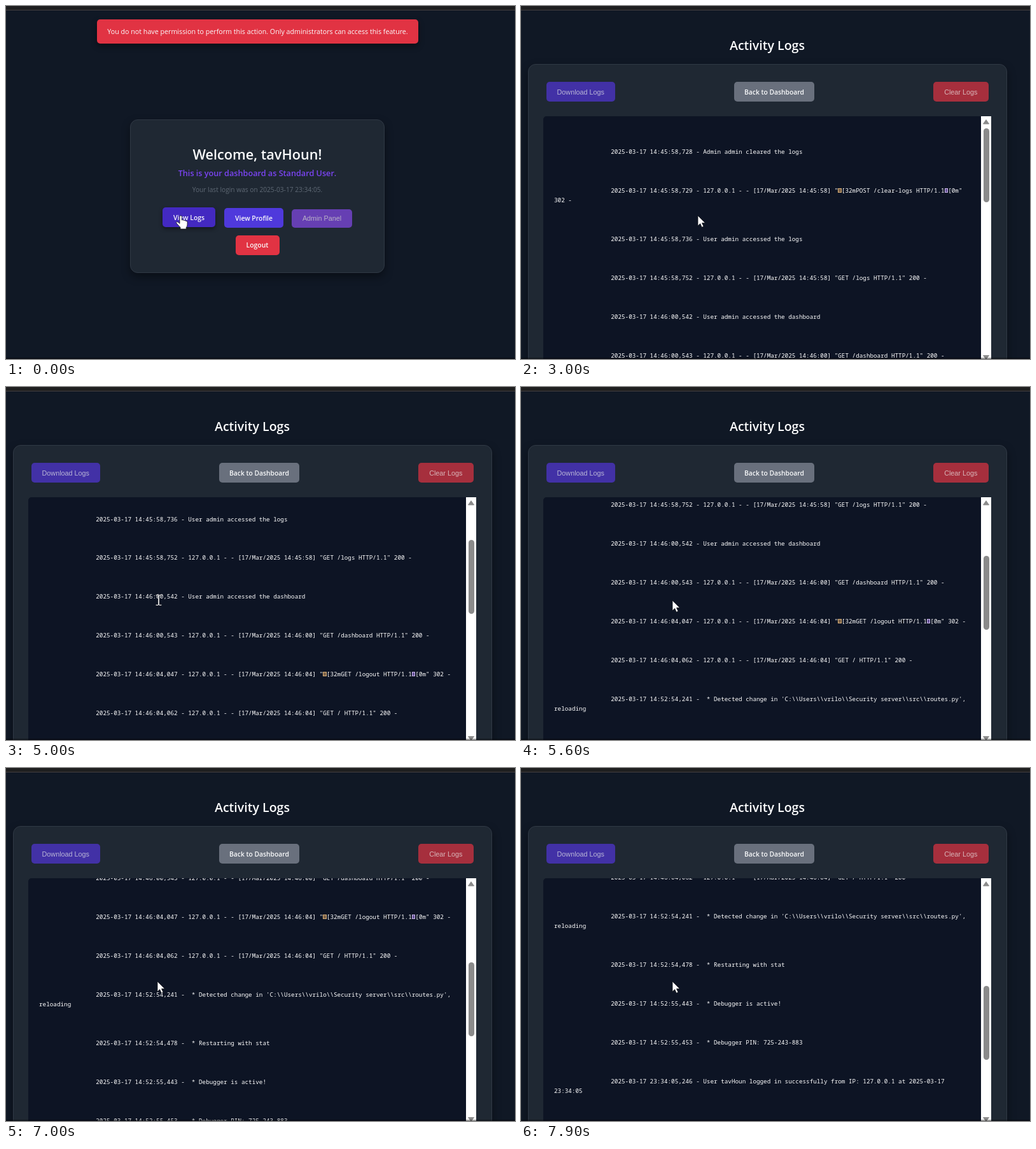
An HTML page that plays this animation: 800 by 554 pixels, repeating every 8 s.

```html
<!DOCTYPE html>
<html lang="en">
<head>
<meta charset="utf-8">
<title>Activity Logs</title>
<style>
  html, body { margin: 0; width: 100%; height: 100%; overflow: hidden; background: #101825; }
  #stage { position: relative; width: 800px; height: 554px; overflow: hidden;
    background: #101825; color: #fafbfc; font: 600 10.4px "Open Sans", "Noto Sans", sans-serif; }
  #stage div, svg { position: absolute; box-sizing: border-box; }
  .page { inset: 0; }
  .box { display: flex; align-items: center; justify-content: center; white-space: nowrap; border-radius: 5px; }
  .card { background: #1f2833; border: 1px solid #303945; border-radius: 12px; box-shadow: 0 6px 14px #0006; }
  .plain { font: 400 10.8px "Liberation Sans", Arial, sans-serif; }
  #view { left: 35px; top: 173px; width: 688px; height: 400px; overflow: hidden;
    background: #0d1424; border-radius: 5px 0 0 5px; }
  #text { left: 17px; white-space: pre; color: #fff;
    font: 500 9.31px/15.24px "Noto Sans Mono", "DejaVu Sans Mono", monospace; }
  #text i { display: inline-block; width: .6em; height: 7px; border: 1px solid #d8b078;
    background: #7d6248; box-sizing: border-box; }
  #text i + i { border-color: #c9b4e8; background: #66549a; }
  #bar { left: 723px; top: 173px; width: 16px; height: 400px; background: #fff; }
  #thumb { left: 3.5px; width: 9px; height: 116px; border-radius: 5px; background: #8a8a8a; }
  svg { left: 0; top: 0; overflow: visible; }
</style>
</head>
<body>
<div id="stage">
  <div class="page" id="dash"></div>
  <div class="page" id="logs">
    <div class="card" style="left:11px;top:90.5px;width:752.5px;height:500px"></div>
    <div id="view"><div id="text"></div></div>
    <div id="bar"><div id="thumb"></div>
      <svg width="16" height="400" fill="#8a8a8a" stroke="#8a8a8a" stroke-linejoin="round">
        <path d="M8 5.500L12.500 12H3.500ZM8 381.500L12.500 375.500H3.500Z"/>
      </svg>
    </div>
  </div>
  <div style="left:0;top:0;width:800px;height:7px;background:#1f1f20;border-bottom:1px solid #443f40"></div>
  <div style="left:0;top:552px;width:800px;height:2px;background:#0006"></div>
  <svg id="pointer" width="1" height="1" fill="#fff" stroke="#15171c" stroke-width=".8" stroke-linejoin="round">
    <path id="arrow" d="M0 0V16L3.700 12.600L6.200 18.200L9 17L6.500 11.600H11.600Z"/>
    <path id="hand" d="M-5 1.500Q-5 0-3.400 0T-1.800 1.500V7Q.4 5.800 1.400 7.600Q3.400 6.600 4.300 8.400Q7 7.800 7 10.200V14Q7 17 5.200 18.500V21H-4V18.500L-10 12Q-11 10.300-9.500 9.800T-5 12.500Z"/>
    <path id="beam" d="M-2.500-9H1L2-8L3-9H6.500V-7.500H3V6.500H6.500V8H3L2 7L1 8H-2.500V6.500H1V-7.500H-2.500Z" stroke-width=".4"/>
  </svg>
</div>
<script>
const $ = id => document.getElementById(id);
const LINE = 15.24, FIRST = 228.5, LOOP = 8000;

function box(page, x, y, w, h, label, css, cls = '') {
  const el = document.createElement('div');
  el.className = 'box ' + cls;
  el.style.cssText = `left:${x}px;top:${y}px;width:${w}px;height:${h}px;${css}`;
  el.textContent = label;
  $(page).append(el);
  return el;
}

box('dash', 195, 178, 400, 241, '', '', 'card');
const toast = box('dash', 143, 21, 505, 38,
  'You do not have permission to perform this action. Only administrators can access this feature.',
  'background:#e13343;font-size:10.7px;font-weight:500;box-shadow:0 4px 10px #0006');
box('dash', 195, 217, 400, 30, 'Welcome, tavHoun!', 'font-size:21.7px');
box('dash', 195, 252, 400, 20, 'This is your dashboard as Standard User.', 'font-size:12.67px;color:#7b44f3');
box('dash', 195, 278, 400, 20, 'Your last login was on 2025-03-17 23:34:05.', 'font-size:10.2px;font-weight:400;color:#5f6975');
box('dash', 246, 316, 83, 31, 'View Logs', 'background:#4329c1;box-shadow:0 3px 6px #0006');
box('dash', 343, 317, 93, 31, 'View Profile', 'background:#4f39dc');
box('dash', 449, 318.5, 95, 29, 'Admin Panel', 'background:#663fb3;color:#b9b2c6', 'plain');
box('dash', 360.5, 359.5, 69, 31, 'Logout', 'background:#e13343');

box('logs', 11, 46, 752, 30, 'Activity Logs', 'font-size:19.6px');
box('logs', 40, 119, 107.5, 31, 'Download Logs', 'background:#4231a6;color:#b8b5d6', 'plain');
box('logs', 335, 119, 126, 31, 'Back to Dashboard', 'background:#69707d;font-size:10.3px');
box('logs', 648, 119, 86.5, 31, 'Clear Logs', 'background:#a62f3d;color:#d8b5b9', 'plain');

// One entry per row; "|" marks a wrapped line, "~" an unprintable character.
const request = (stamp, ms, call) =>
  `${stamp},${ms} - 127.0.0.1 - - [17/Mar/2025 ${stamp}] "${call} -`;
const entries = [
  '14:45:58,728 - Admin admin cleared the logs',
  request('14:45:58', 729, '~[32mPOST /clear-logs HTTP/1.1~[0m"|302'),
  '14:45:58,736 - User admin accessed the logs',
  request('14:45:58', 752, 'GET /logs HTTP/1.1" 200'),
  '14:46:00,542 - User admin accessed the dashboard',
  request('14:46:00', 543, 'GET /dashboard HTTP/1.1" 200'),
  request('14:46:04', '047', '~[32mGET /logout HTTP/1.1~[0m" 302'),
  request('14:46:04', '062', 'GET / HTTP/1.1" 200'),
  "14:52:54,241 -  * Detected change in 'C:\\\\Users\\\\vrilo\\\\Security server\\\\src\\\\routes.py',|reloading",
  '14:52:54,478 -  * Restarting with stat',
  '14:52:55,443 -  * Debugger is active!',
  '14:52:55,453 -  * Debugger PIN: 725-243-883',
  '23:34:05,246 - User tavHoun logged in successfully from IP: 127.0.0.1 at 2025-03-17|23:34:05'
];
const rowY = [];
let lines = 0;
$('text').innerHTML = entries.map(entry => {
  rowY.push(FIRST + lines * LINE);
  lines += entry.includes('|') ? 5 : 4;
  const row = ' '.repeat(16) + '2025-03-17 ' + entry.replace('|', '\n').replaceAll('~', '<i></i>');
  return `<span>${row}</span>`;
}).join('\n\n\n\n');

const clamp = v => Math.min(1, Math.max(0, v));

// Straight runs between [time, value] points.
function along(points, t) {
  let [t0, v0] = points[0];
  for (const [t1, v1] of points) {
    if (t < t1) return v0 + (v1 - v0) * clamp((t - t0) / (t1 - t0));
    [t0, v0] = [t1, v1];
  }
  return v0;
}
const scrollPath = [[3600, 0], [5000, 158.5], [5900, 283], [6200, 298.5], [6600, 298.5], [7000, 376], [7900, 499]];

function draw(now) {
  const t = Math.floor(now % LOOP / 100) * 100;
  const onLogs = t >= 1800;
  $('dash').style.display = onLogs ? 'none' : '';
  $('logs').style.opacity = clamp((t - 1700) / 500);
  toast.style.opacity = clamp(1 - t / 800);

  const scroll = along(scrollPath, t);
  $('text').style.top = FIRST - 173 - LINE / 2 - scroll + 'px';
  $('thumb').style.top = 19 + scroll * .301 + 'px';

  const p = clamp((t - 3000) / 300), ease = p * p * (3 - 2 * p);
  const x = 278 - 40 * ease, y = 329 + 6 * ease;
  $('pointer').style.transform = `translate(${x}px,${y}px)`;
  const overText = onLogs && rowY.some(row => Math.abs(row - scroll - y) < LINE / 2);
  const shape = t < 1500 ? 'hand' : overText ? 'beam' : 'arrow';
  for (const id of ['arrow', 'hand', 'beam']) $(id).style.display = id === shape ? '' : 'none';
}

const start = performance.now();
(function tick() {
  draw(performance.now() - start);
  requestAnimationFrame(tick);
})();
</script>
</body>
</html>
```
